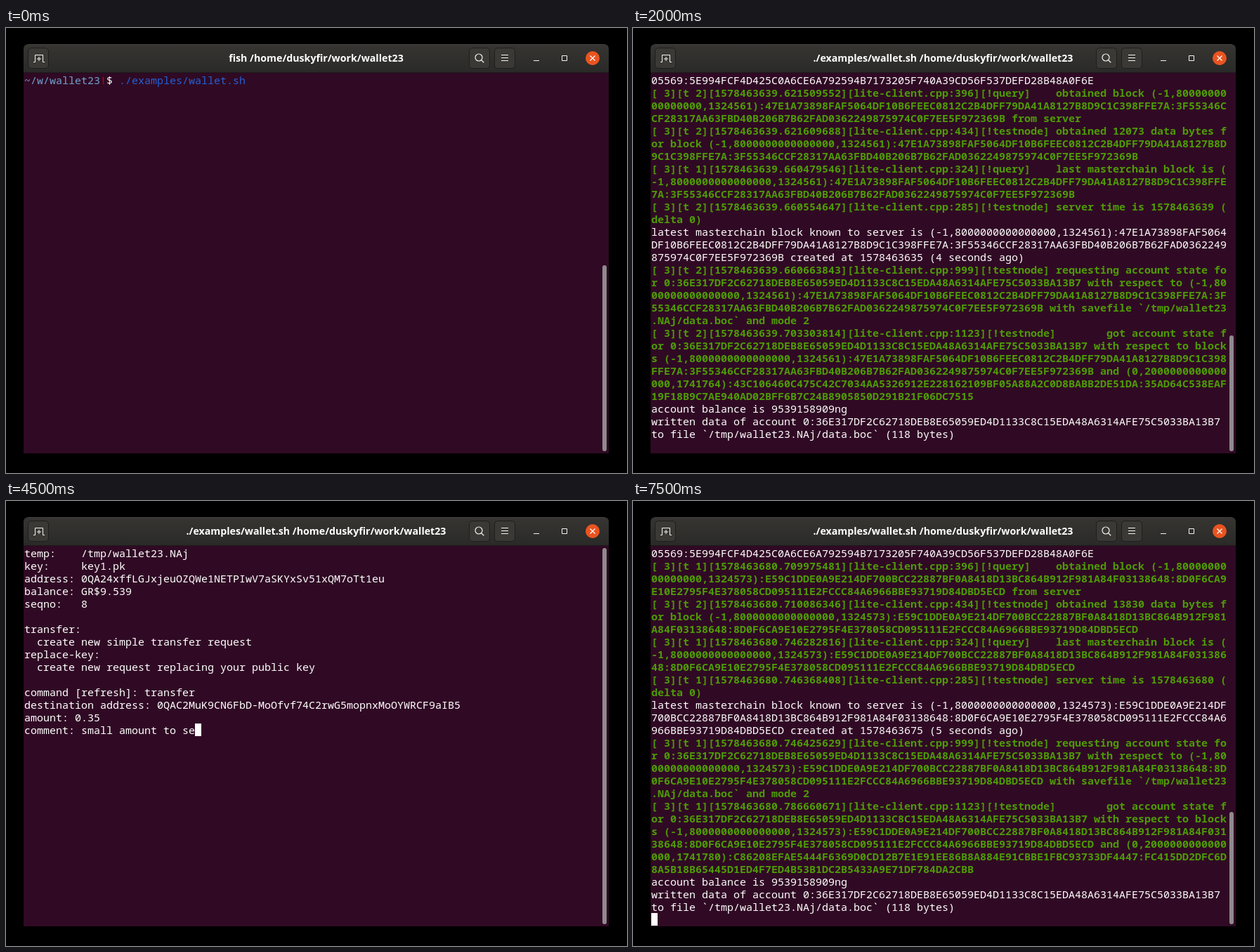
Write an HTML page that moves like this. It is 884 px wide and 634 px high and loops after 8 s.

```html
<!DOCTYPE html>
<html lang="en">
<head>
<meta charset="utf-8">
<title>Terminal session</title>
<style>
  html, body { margin: 0; width: 100%; height: 100%; overflow: hidden; background: #000; }
  #stage { position: relative; width: 884px; height: 634px; overflow: hidden; }
  #stage > * { position: absolute; }
  svg { left: 0; top: 0; }
  #title {
    left: 25px; top: 23px; width: 833px; text-align: center; color: #fff;
    font: bold 14.2px/40px "Open Sans", "Noto Sans", sans-serif;
  }
  #text {
    left: 26px; top: 65px; margin: 0; color: #fff;
    font: 15px/18px "Noto Sans Mono", "DejaVu Sans Mono", monospace;
    font-variant-ligatures: none;
  }
  #text div { height: 18px; white-space: pre; }
  #cursor { width: 9px; height: 18px; background: #fff; }
  #bar { left: 849px; width: 6px; border-radius: 3px; background: #8f8a8d; }
  .red { color: #c00; font-weight: bold; }
  .amber { color: #c4a000; font-weight: bold; }
  .green { color: #4e9a06; font-weight: bold; }
  .path { color: #729fcf; }
  .mark { color: #c00; }
  .cmd { color: #2560d4; }
</style>
</head>
<body>
<div id="stage">
  <svg width="884" height="634" fill="none">
    <defs>
      <linearGradient id="head" x2="0" y2="1">
        <stop stop-color="#363532"/><stop offset="1" stop-color="#2a2a28"/>
      </linearGradient>
    </defs>
    <path d="M25 63V30q0-7 7-7h819q7 0 7 7v33z" fill="url(#head)"/>
    <path d="M31 23.5h821" stroke="#454441"/>
    <path d="M25 63h833v543H25z" fill="#300a24"/>
    <path d="M25 63.5h833" stroke="#1d1a1b"/>
    <g fill="#3a3936" stroke="#1f1e1d">
      <rect x="31.5" y="28.5" width="29" height="29" rx="4.5"/>
      <rect x="659.5" y="28.5" width="29" height="29" rx="4.5"/>
      <rect x="695.5" y="28.5" width="29" height="29" rx="4.5"/>
    </g>
    <g stroke="#f4f4f2">
      <path d="M39 48.5h2.5v-10h11v10H55M47 41v6M44 44h6"/>
      <circle cx="673" cy="42" r="5" stroke-width="1.2"/>
      <path d="M676.6 45.6l3.6 3.6" stroke-width="1.3"/>
      <path d="M705 38.5h10M705 42.5h10M705 46.5h10M751 46.5h8"/>
      <path d="M791.5 39.5h7v7h-7z"/>
    </g>
    <circle cx="835" cy="43" r="10" fill="#e95420"/>
    <path d="M831.5 39.5l7 7M838.5 39.5l-7 7" stroke="#fff" stroke-width="1.3"/>
  </svg>
  <div id="title"></div>
  <div id="text"></div>
  <div id="cursor"></div>
  <div id="bar"></div>
</div>
<script>
const COLS = 91, STEP = 500;
const TEMP = "/tmp/wallet23.NAj";
const HOME = "/home/duskyfir/work/wallet23";
const ZERO = "17A3A92992AABEA785A7A090985A265CD31F323D849DA51239737E321FB05569:" +
  "5E994FCF4D425C0A6CE6A792594B7173205F740A39CD56F537DEFD28B48A0F6E";
const ACCOUNT = "0:36E317DF2C62718DEB8E65059ED4D1133C8C15EDA48A6314AFE75C5033BA13B7";

// A row is a list of [class, text] spans; long text breaks at the last column.
const wrap = (text, cls = "") =>
  (text.match(new RegExp(`.{1,${COLS}}`, "g")) || [""]).map(part => [[cls, part]]);
const lines = text => text.split("\n").flatMap(line => wrap(line));

function session(run) {
  const { now, age, threads, times } = run;
  const block = `(-1,8000000000000000,${run.seq}):${run.hash}`;
  let entry = 0;
  const log = (level, source, tag, message) => {
    const head = `[ ${level}][t ${threads[entry]}][${now}.${times[entry++]}][lite-client.${source}][!${tag}]`;
    const tabbed = head.padEnd((head.length >> 3) * 8 + 8);
    return wrap(tabbed + message, ["", "red", "amber", "green"][level]);
  };
  const last = () => log(3, "cpp:324", "query", `last masterchain block is ${block}`);
  const clock = () => log(3, "cpp:285", "testnode", `server time is ${now} (delta 0)`);
  const latest = `latest masterchain block known to server is ${block} created at ${now - age} (${age} seconds ago)`;

  const start = [
    ...lines(`Connecting to test.ton.org (test.ton.org)|18.194.142.57|:443... connected.
HTTP request sent, awaiting response... 200 OK
Length: 498 [application/json]
Saving to: ‘${TEMP}/lite-client.json’

${TEMP}/lite 100%[${"=".repeat(27)}>]     498  --.-KB/s    in 0s

2020-01-08 ${run.clock} (29.2 MB/s) - ‘${TEMP}/lite-client.json’ saved [498/498]

using liteserver 0 with addr [67.207.74.182:4924]
zerostate set to -1:${ZERO}`),
    ...log(1, "h:199", "testnode", "conn ready"),
    ...log(2, "cpp:276", "testnode", "server version is 1.1, capabilities 3"),
    ...clock(), ...last(), ...clock(),
    ...lines(`${latest}
BLK#1 = ${block}
BLK#2 = (-1,8000000000000000,0):${ZERO}`)
  ];
  const end = [
    ...start,
    ...log(3, "cpp:396", "query", `obtained block ${block} from server`),
    ...log(3, "cpp:434", "testnode", `obtained ${run.bytes} data bytes for block ${block}`),
    ...last(), ...clock(), ...lines(latest),
    ...log(3, "cpp:999", "testnode", `requesting account state for ${ACCOUNT} with respect to ${block} with savefile \`${TEMP}/data.boc\` and mode 2`),
    ...log(3, "cpp:1123", "testnode", `got account state for ${ACCOUNT} with respect to blocks ${block} and (0,2000000000000000,${run.shard}`),
    ...lines(`account balance is 9539158909ng
written data of account ${ACCOUNT} to file \`${TEMP}/data.boc\` (118 bytes)`)
  ];
  return [start, end].map(rows => [...rows.slice(-29), ...wrap("")]);
}

const [startA, endA] = session({
  now: 1578463639, age: 4, clock: "08:07:19", seq: 1324561, bytes: 12073,
  hash: "47E1A73898FAF5064DF10B6FEEC0812C2B4DFF79DA41A8127B8D9C1C398FFE7A:" +
    "3F55346CCF28317AA63FBD40B206B7B62FAD0362249875974C0F7EE5F972369B",
  shard: "1741764):43C106460C475C42C7034AA5326912E228162109BF05A88A2C0D8BABB2DE51DA:" +
    "35AD64C538EAF19F18B9C7AE940AD02BFF6B7C24B8905850D291B21F06DC7515",
  threads: "12221221222",
  times: ["494206905", "534881353", "534978867", "576594591", "576722860", "621509552",
    "621609688", "660479546", "660554647", "660663843", "703303814"]
});
const [startB, endB] = session({
  now: 1578463680, age: 5, clock: "08:08:00", seq: 1324573, bytes: 13830,
  hash: "E59C1DDE0A9E214DF700BCC22887BF0A8418D13BC864B912F981A84F03138648:" +
    "8D0F6CA9E10E2795F4E378058CD095111E2FCCC84A6966BBE93719D84DBD5ECD",
  shard: "1741780):C86208EFAE5444F6369D0CD12B7E1E91EE86B8A884E91CBBE1FBC93733DF4447:" +
    "FC415DD2DFC6D8A5B18B65445D1ED4F7ED4B53B1DC2B5433A9E71DF784DA2CBB",
  threads: "12221321111".replace("3", "2").replace(/^(.{5})./, "$11"),
  times: ["586104217", "625310846", "625402173", "666218405", "666341972", "709975481",
    "710086346", "746282816", "746368408", "746425629", "786660671"]
});

const prompt = [["path", "~/w/wallet23"], ["mark", "!"], ["", "$ "], ["cmd", "./examples/wallet.sh"]];
const keyPrompt = typed => [prompt, ...lines(`temp:    ${TEMP}

keys:    key1.pk
private key [new]: ${typed}`)];

const menu = typed => lines(`temp:    ${TEMP}
key:     key1.pk
address: 0QA24xffLGJxjeuOZQWe1NETPIwV7aSKYxSv51xQM7oTt1eu
balance: GR$9.539
seqno:   8

transfer:
  create new simple transfer request
replace-key:
  create new request replacing your public key

command [refresh]: ${typed}`);
const TARGET = "transfer\ndestination address: 0QAC2MuK9CN6FbD-MoOfvf74C2rwG5mopnxMoOYWRCF9aIB5";
const AMOUNT = TARGET + "\namount: 0.35";
const COMMENT = "small amount to send and long comment to write to show that it's " +
  "correctly parsed and i don't know what else. gosh";
const comment = count => menu(`${AMOUNT}\ncomment: ${COMMENT.slice(0, count)}`);

// Each scene: rows, top of the scroll bar, cursor shown.
const scenes = [
  [[prompt], 338, false],
  [keyPrompt(""), 338, true],
  [keyPrompt("ke"), 338, true],
  [startA, 367, true],
  [endA, 438, false],
  [menu(""), 67, false],
  [menu("trans"), 67, true],
  [menu(TARGET), 67, false],
  [menu(AMOUNT), 67, true],
  ...[18, 49, 79, 101, 114].map(count => [comment(count), 67, true]),
  [startB, 372, true],
  [endB, 443, true]
];

const [title, text, cursor, bar] =
  ["title", "text", "cursor", "bar"].map(id => document.getElementById(id));

function show(index) {
  const [rows, top, blink] = scenes[index];
  title.textContent = `${index ? "./examples/wallet.sh" : "fish"} ${HOME}`;
  text.replaceChildren(...rows.map(row => {
    const line = document.createElement("div");
    for (const [cls, part] of row) {
      const span = document.createElement("span");
      span.className = cls;
      span.textContent = part;
      line.append(span);
    }
    return line;
  }));
  const column = rows.at(-1).reduce((sum, [, part]) => sum + part.length, 0);
  cursor.style.left = `${26 + 9 * column}px`;
  cursor.style.top = `${65 + 18 * (rows.length - 1)}px`;
  cursor.hidden = !blink;
  bar.style.top = `${top}px`;
  bar.style.height = `${603 - top}px`;
}

const begin = performance.now();
let shown = -1;
function tick() {
  const index = Math.floor((performance.now() - begin) / STEP) % scenes.length;
  if (index !== shown) show(shown = index);
  requestAnimationFrame(tick);
}
tick();
</script>
</body>
</html>
```
